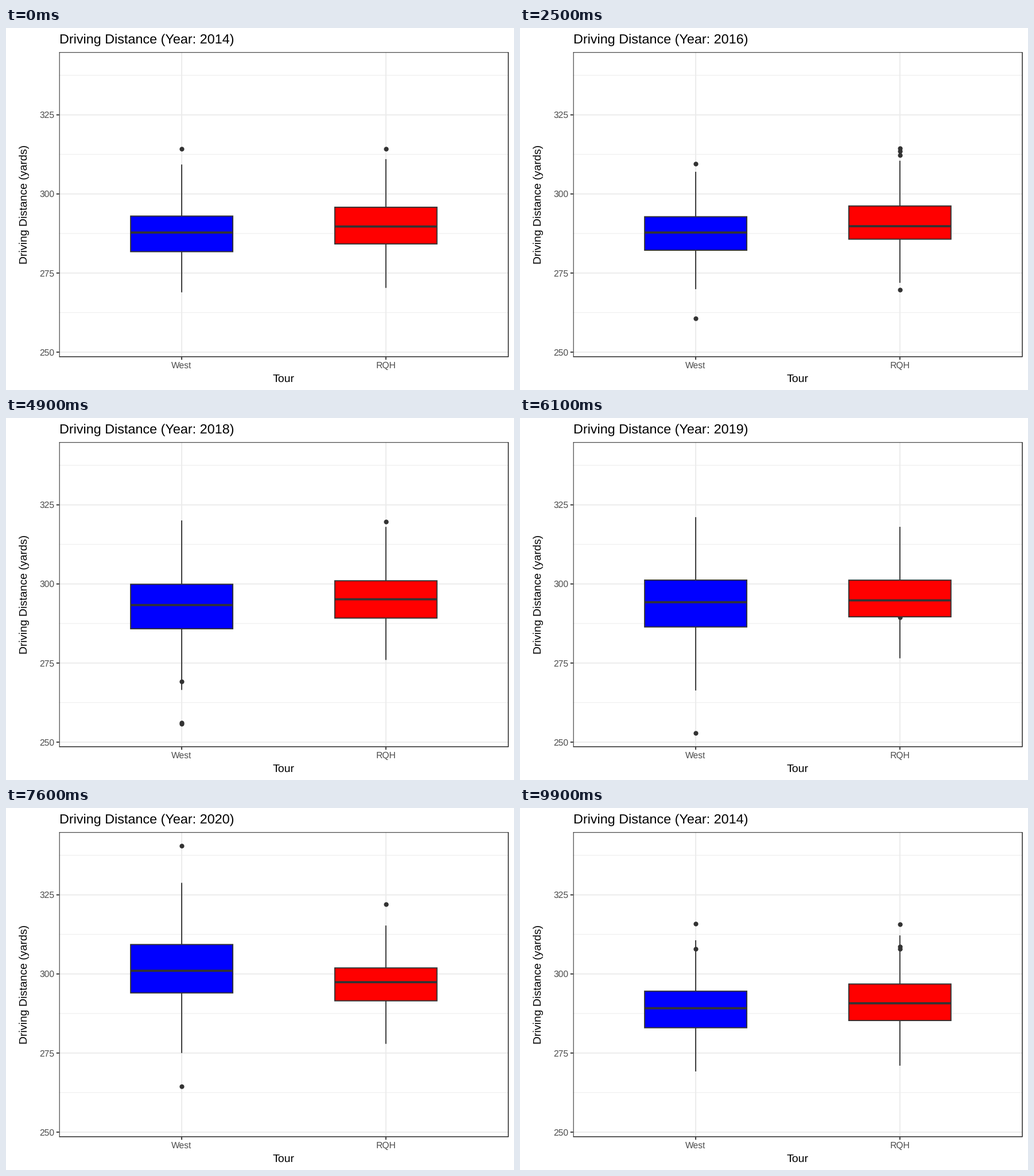
Write a matplotlib script that moves like this. It is 885 px wide and 632 px high and loops after 10000 ms.

```python
import matplotlib.pyplot as plt
from matplotlib.animation import FuncAnimation
from matplotlib.patches import Rectangle

plt.rcParams["font.family"] = "Liberation Sans"
plt.rcParams["text.hinting"] = "none"

W, H, DPI = 885, 632, 100
PT = 72 / DPI                      # points per pixel
LEFT, RIGHT, TOP, BOTTOM = 92.7, 875.3, 42.2, 574.3
DARK, GREY, GRID = "#333333", "#4D4D4D", "#EBEBEB"
LINE = 1.9
HALF_BOX = 89

FIRST_YEAR = 2014
TOURS = [("West", 306.1, "#0000FF"), ("RQH", 661.8, "#FF0000")]

# Per year: (low whisker, Q1, median, Q3, high whisker), outliers
STATS = [
    [
        ((268.9, 281.75, 287.8, 293.0, 309.3), [314.3]),
        ((269.2, 281.8, 287.7, 293.1, 308.6), [264.9]),
        ((269.9, 282.2, 287.8, 292.8, 307.0), [309.5, 260.6]),
        ((270.4, 285.6, 292.5, 297.8, 314.9), [318.0, 265.8, 264.5]),
        ((265.2, 285.9, 293.6, 300.6, 321.8), [252.9]),
        ((267.0, 286.7, 294.6, 301.6, 320.7), []),
        ((275.0, 294.0, 301.0, 309.3, 328.8), [340.5, 264.5]),
        ((270.9, 290.4, 297.4, 303.9, 318.7), [325.3, 269.4]),
    ],
    [
        ((270.3, 284.2, 289.7, 295.8, 311.0), [314.3]),
        ((270.2, 284.7, 289.8, 295.6, 309.9), [317.7, 315.2]),
        ((271.9, 285.7, 289.8, 296.2, 310.5), [314.5, 313.6, 312.2, 269.7]),
        ((271.4, 286.5, 292.6, 298.9, 317.2), []),
        ((277.5, 290.1, 296.0, 301.7, 318.3), [319.7]),
        ((275.9, 289.3, 294.1, 300.9, 317.9), [271.2]),
        ((277.9, 291.5, 297.4, 301.9, 315.3), [322.1]),
        ((275.2, 291.7, 296.9, 302.9, 319.3), [323.7, 274.7, 269.3]),
    ],
]
YEARS = len(STATS[0])
STARTS = [5, 18, 31, 44, 57, 70, 82, 94]
STEPS = [8, 8, 8, 8, 8, 7, 7, 7]


def y_px(yards):
    return 289.7 + (300 - yards) * 5.523


def lerp(a, b, p):
    return a + (b - a) * p


def phase(frame):
    """Year index and progress towards the next year."""
    for i, (start, steps) in enumerate(zip(STARTS, STEPS)):
        p = (frame - start + 1) / steps
        if p < 1:
            return i, max(p, 0)
    return 0, 0


def mix_outliers(a, b, p):
    """Cycle the shorter list; an empty one gathers at the other's mean."""
    if p == 0 or not (a or b):
        return a
    a = a or [sum(b) / len(b)]
    b = b or [sum(a) / len(a)]
    return [lerp(a[i % len(a)], b[i % len(b)], p)
            for i in range(max(len(a), len(b)))]


fig = plt.figure(figsize=(W / DPI, H / DPI), dpi=DPI, facecolor="white")
ax = fig.add_axes([0, 0, 1, 1])
ax.set_xlim(0, W)
ax.set_ylim(H, 0)
ax.axis("off")


def line(xs, ys, color=DARK, width=LINE, z=1, cap="butt"):
    return ax.plot(xs, ys, color=color, lw=width * PT, zorder=z,
                   solid_capstyle=cap, snap=False)[0]


def label(x, y, text, px, color="black", ha="center", rotation=0):
    return ax.text(x, y, text, fontsize=px * PT, color=color, ha=ha,
                   va="baseline", rotation=rotation, rotation_mode="anchor")


class Box:
    def __init__(self, x, fill):
        self.x = x
        self.dots = ax.plot([], [], "o", color=DARK, ms=8.2 * PT, mew=0,
                            zorder=3, snap=False)[0]
        self.whiskers = [line([x, x], [0, 0], z=4) for _ in range(2)]
        self.body = Rectangle((x - HALF_BOX, 0), 2 * HALF_BOX, 1, fc=fill,
                              ec=DARK, lw=LINE * PT, joinstyle="miter",
                              zorder=5, snap=False)
        ax.add_patch(self.body)
        self.median = line([x - HALF_BOX, x + HALF_BOX], [0, 0],
                           width=2 * LINE, z=6)

    def update(self, stats, outliers):
        low, q1, mid, q3, high = map(y_px, stats)
        self.whiskers[0].set_ydata([low, q1])
        self.whiskers[1].set_ydata([q3, high])
        self.body.set_y(q3)
        self.body.set_height(q1 - q3)
        self.median.set_ydata([mid, mid])
        self.dots.set_data([self.x] * len(outliers), [y_px(v) for v in outliers])


def draw_panel():
    for yards in (262.5, 287.5, 312.5, 337.5):
        line([LEFT, RIGHT], [y_px(yards)] * 2, GRID, LINE / 2)
    for yards in (250, 275, 300, 325):
        y = y_px(yards)
        line([LEFT, RIGHT], [y, y], GRID)
        line([LEFT - 4.9, LEFT], [y, y], z=7)
        label(84.2, y + 5.6, str(yards), 15.64, GREY, "right")
    for name, x, _ in TOURS:
        line([x, x], [TOP, BOTTOM], GRID)
        line([x, x], [BOTTOM, BOTTOM + 4.9], z=7)
        label(x, 594, name, 15.64, GREY)
    # The border is clipped thinner along its left and top edges
    line([LEFT + 0.5] * 2, [TOP, BOTTOM], width=1.1, z=8)
    line([LEFT, RIGHT], [TOP + 0.5] * 2, width=1.1, z=8)
    line([RIGHT - 0.2] * 2, [TOP, BOTTOM], width=1.6, z=8)
    line([LEFT, RIGHT], [BOTTOM - 0.4] * 2, width=1.6, z=8)
    label(484, 618, "Tour", 19.5)
    label(37, 308, "Driving Distance (yards)", 19.5, rotation=90)


draw_panel()
title = label(LEFT, 27, "", 23.4, ha="left")
boxes = [Box(x, fill) for _, x, fill in TOURS]


def update(frame):
    now, p = phase(frame)
    after = (now + 1) % YEARS
    title.set_text(f"Driving Distance (Year: {FIRST_YEAR + (after if p > 0.5 else now)})")
    for box, years in zip(boxes, STATS):
        (stats_a, out_a), (stats_b, out_b) = years[now], years[after]
        stats = [lerp(a, b, p) for a, b in zip(stats_a, stats_b)]
        box.update(stats, mix_outliers(out_a, out_b, p))
    return []


anim = FuncAnimation(fig, update, frames=100, interval=100, repeat=True,
                     repeat_delay=0, init_func=lambda: update(0))
plt.show()
```
